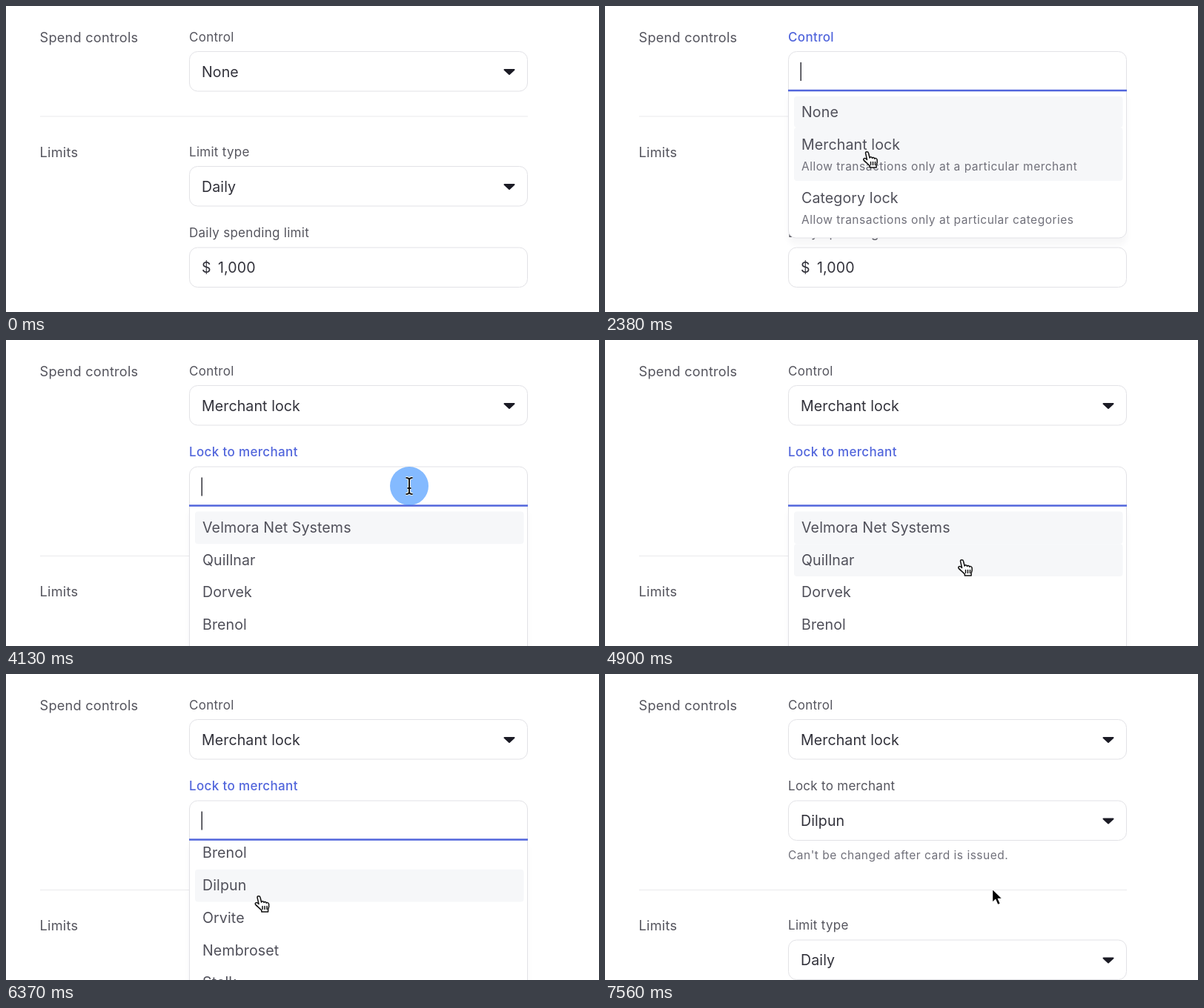
Animation of 800 by 413 pixels, one loop 8000 ms. Source, as an HTML page:

```html
<!DOCTYPE html>
<html lang="en">
<head>
<meta charset="utf-8">
<title>Spend controls</title>
<style>
  html, body { margin: 0; width: 100%; height: 100%; overflow: hidden; background: #fff; }
  svg { display: block; width: 800px; height: 413px; }
  text { font-family: Inter, sans-serif; font-optical-sizing: none; white-space: pre; }
  .section { font-size: 18.2px; letter-spacing: .22px; fill: #55555e; }
  .label { font-size: 17px; letter-spacing: .28px; fill: #55555e; }
  .active { font-weight: 500; letter-spacing: .35px; fill: #5266dc; }
  .value { font-size: 19.6px; letter-spacing: .08px; fill: #32323b; }
  .option { font-size: 19.6px; letter-spacing: .1px; fill: #50505a; }
  .hint { font-size: 15.5px; letter-spacing: .5px; fill: #70707a; }
  .box { fill: #fff; stroke: #e2e2e6; }
  .menu { filter: drop-shadow(0 9px 3px rgba(40, 40, 70, .035)); }
  .row { fill: #f6f7f9; }
  .arrow { fill: #1b1b25; stroke: #1b1b25; stroke-width: 2; stroke-linejoin: round; }
</style>
</head>
<body>
<svg viewBox="0 0 800 413">
  <defs>
    <g id="pointer">
      <path d="M0 0V18.5L4.3 14.6 7.3 21.6 10.9 20 8 13.3H13.6Z" fill="#000" stroke="#fff" stroke-width="1.3"/>
    </g>
    <g id="hand" stroke="#111" stroke-width="1.5" stroke-linejoin="round" stroke-linecap="round">
      <path fill="#fff" d="M-2 1.5C-2-.8 1.5-.8 2 1.5L3.6 8C4 6.3 6.6 6.5 7 8.4C7.6 7 9.8 7.4 10.2 9.2C11 8 13.3 8.4 13.6 10.5C14.2 13.5 13.8 15 12.6 18V21H3.8V19C2 17-1.5 14-4 11.6C-6 9.6-3.6 7.6-1.6 9L0 10.4Z"/>
      <path d="M5 13.5v4M8 13.5v4M11 13.5v4"/>
    </g>
    <path id="beam" d="M-4.5-11Q0-11 0-8Q0-11 4.5-11M0-8V8M-4.5 11Q0 11 0 8Q0 11 4.5 11M-2.5 3H2.5"/>
    <g id="ibeam" fill="none">
      <use href="#beam" stroke="#fff" stroke-width="3.8"/>
      <use href="#beam" stroke="#111" stroke-width="1.9"/>
    </g>
    <clipPath id="list"><path d="M247 225H704V413H247Z"/></clipPath>
  </defs>
  <g id="scene"></g>
</svg>
<script>
const LOOP = 8000;
const CONTROL_OPEN = 1190, CONTROL_PICKED = 2730;
const MERCHANT_OPEN = 4100, MERCHANT_PICKED = 6930;
const CLICKS = [1150, 2590, 4060, 6790];
// time, x, y of the cursor's hot spot
const PATH = [
  [490, 800, 250], [1120, 393, 91], [1500, 393, 91], [2380, 353.5, 197],
  [3500, 353.5, 197], [3990, 544, 197], [4550, 544, 197], [4900, 481.5, 297],
  [5880, 481.5, 297], [6370, 341, 300], [6950, 341, 300], [7500, 522.5, 290]
];
const CONTROLS = [
  { name: 'None', height: 42 },
  { name: 'Merchant lock', height: 72, hint: 'Allow transactions only at a particular merchant' },
  { name: 'Category lock', height: 71, hint: 'Allow transactions only at particular categories' }
];
const MERCHANTS = ['Velmora Net Systems', 'Quillnar', 'Dorvek', 'Brenol', 'Dilpun', 'Orvite', 'Nembroset', 'Stelk']
  .map(name => ({ name, height: 43.8 }));

const scene = document.getElementById('scene');
const clamp = v => Math.max(0, Math.min(1, v));
const ease = v => v * v * (3 - 2 * v);
const progress = (t, from, to) => ease(clamp((t - from) / (to - from)));

const text = (style, x, y, content) => `<text class="${style}" x="${x}" y="${y}">${content}</text>`;
const divider = y => `<path d="M46 ${y}H704" stroke="#e9e9ec"/>`;

function field(y, label, value, isSelect = true) {
  return text('label', 247, y - 13.5, label)
    + `<rect class="box" x="247.5" y="${y + .5}" width="456" height="53.5" rx="11"/>`
    + text('value', 264, y + 34.5, value)
    + (isSelect ? `<path class="arrow" d="M672.5 ${y + 25}h13l-6.5 6z"/>` : '');
}

function focusedField(y, label, openFor) {
  const caret = openFor % 1040 < 520;
  return text('label active', 247, y - 13.5, label)
    + `<path class="box" d="M247.5 ${y + 53}V${y + 11.5}a11 11 0 0 1 11-11H692.5a11 11 0 0 1 11 11V${y + 53}"/>`
    + `<rect x="247" y="${y + 51.8}" width="457" height="2.5" fill="#5266dc"/>`
    + (caret ? `<rect x="263.5" y="${y + 15}" width="1.5" height="25" fill="#32323b"/>` : '');
}

function menu(top, height, options, cursor, scroll = 0) {
  const bottom = top + height;
  let y = top + 7 - scroll, rows = '';
  options.forEach((option, i) => {
    const hovered = cursor.y > top && cursor.y >= y && cursor.y < y + option.height;
    if (i === 0 || hovered)
      rows += `<rect class="row" x="255" y="${y}" width="443.5" height="${option.height}" rx="4"/>`;
    rows += text('option', 265, y + (option.hint ? 30 : 28.3), option.name);
    if (option.hint) rows += text('hint', 265, y + 58, option.hint);
    y += option.height;
  });
  const clip = options === MERCHANTS ? ' clip-path="url(#list)"' : '';
  return `<path class="box menu" d="M247.5 ${top}V${bottom - 10}a10 10 0 0 0 10 10H693.5a10 10 0 0 0 10-10V${top}"/>`
    + `<g${clip}>${rows}</g>`;
}

function cursorAt(t) {
  let i = PATH.findIndex(p => p[0] > t);
  if (i < 0) i = PATH.length - 1;
  if (i === 0) return { x: 900, y: 0 };
  const [t0, x0, y0] = PATH[i - 1], [t1, x1, y1] = PATH[i];
  const k = progress(t, t0, t1);
  return { x: x0 + (x1 - x0) * k, y: y0 + (y1 - y0) * k };
}

function drawCursor(t, { x, y }, listTop, merchantShown) {
  const within = top => y > top && y < top + 54;
  const overBoxes = x > 247 && x < 704;
  let shape = 'pointer';
  if (overBoxes && listTop && y > listTop) shape = 'hand';
  else if (overBoxes && (within(61) || merchantShown && within(170))) shape = 'ibeam';
  const glow = Math.max(...CLICKS.map(c => clamp((t - c) / 70) * clamp((c + 350 - t) / 140)));
  return `<circle cx="${x}" cy="${y}" r="26" fill="#328cff" opacity="${.6 * glow}"/>`
    + `<use href="#${shape}" x="${x}" y="${y}"/>`;
}

function draw(t) {
  const controlOpen = t >= CONTROL_OPEN && t < CONTROL_PICKED;
  const merchantOpen = t >= MERCHANT_OPEN && t < MERCHANT_PICKED;
  const merchantShown = t >= CONTROL_PICKED;
  const shift = merchantShown ? 142.5 : 0;
  const cursor = cursorAt(t);

  let out = text('section', 45.5, 48.5, 'Spend controls')
    + divider(149 + shift)
    + text('section', 45.5, 203.5 + shift, 'Limits')
    + field(216 + shift, 'Limit type', 'Daily')
    + field(325.5 + shift, 'Daily spending limit', '$<tspan x="286">1,000</tspan>', false);

  if (merchantShown && !merchantOpen)
    out += field(170.5, 'Lock to merchant', t >= MERCHANT_PICKED ? MERCHANTS[4].name : '')
      + text('hint', 247, 249.5, "Can't be changed after card is issued.");

  out += controlOpen
    ? menu(115, 198, CONTROLS, cursor) + focusedField(61, 'Control', t - CONTROL_OPEN)
    : field(61, 'Control', merchantShown ? 'Merchant lock' : 'None');

  if (merchantOpen)
    out += menu(224.5, 260, MERCHANTS, cursor, 143 * progress(t, 5150, 5670))
      + focusedField(170.5, 'Lock to merchant', t - MERCHANT_OPEN);

  const listTop = controlOpen ? 115 : merchantOpen ? 224.5 : 0;
  scene.innerHTML = out + drawCursor(t, cursor, listTop, merchantShown);
}

function tick() {
  draw(performance.now() % LOOP);
  requestAnimationFrame(tick);
}
tick();
</script>
</body>
</html>
```
